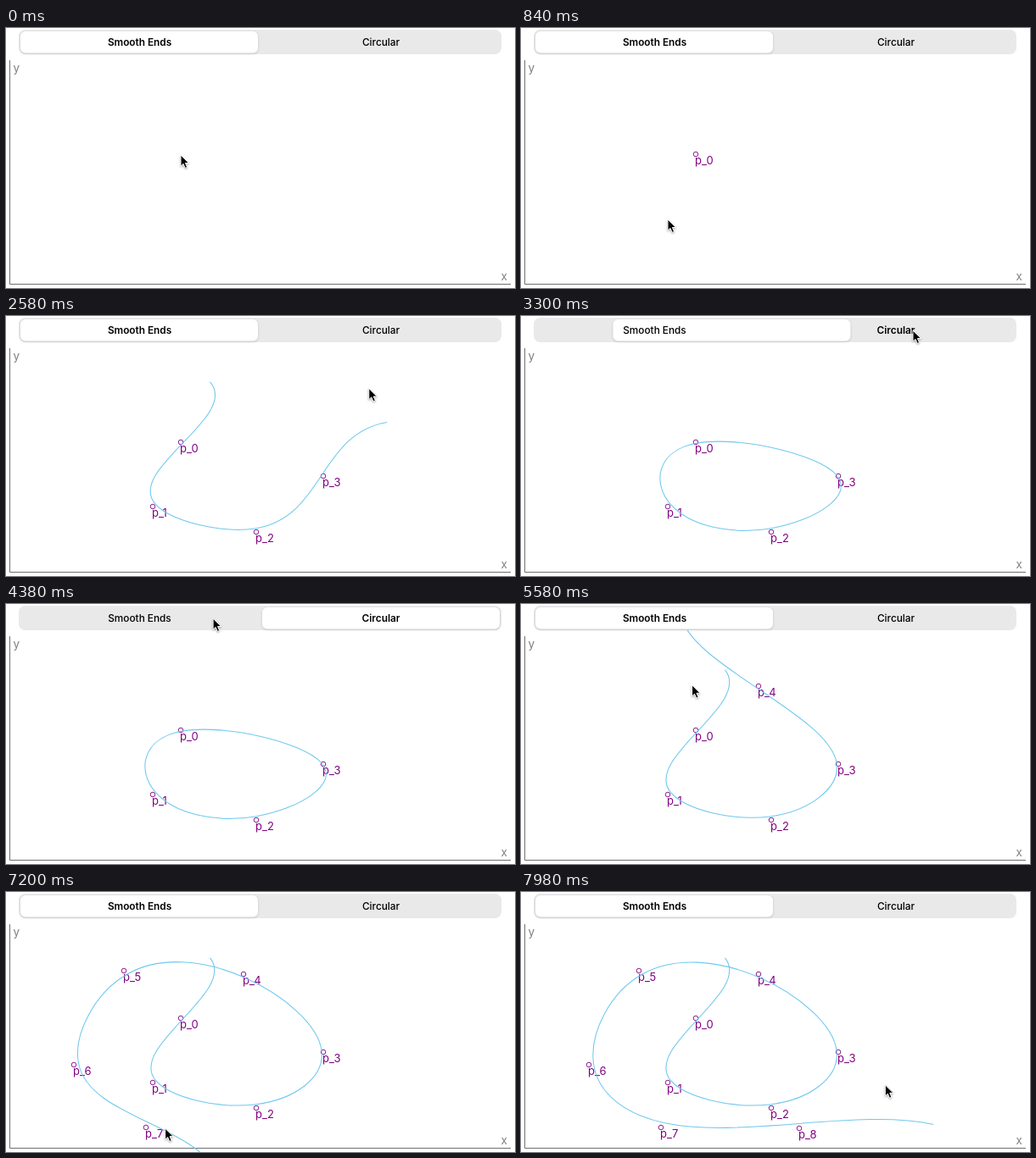
An HTML page for the animation above (8000 ms loop, 600 px wide and 307 px high).

```html
<!DOCTYPE html>
<html lang="en">
<head>
<meta charset="utf-8">
<title>Spline editor</title>
<style>
  html, body { margin: 0; width: 100%; height: 100%; overflow: hidden; background: #fff; }
  svg { display: block; width: 100vw; height: 100vh; font-family: Inter, Roboto, sans-serif; }
  .axis { fill: none; stroke: #6f6f6f; stroke-width: 1; }
  .axis-name { font-size: 13.5px; fill: #7f7f7f; }
  #curve { fill: none; stroke: #6fc8ee; stroke-width: 1.05; }
  .point circle { fill: none; stroke: #800080; stroke-width: .9; }
  .point text { font-size: 13px; fill: #800080; }
  .tab { font-size: 11.8px; font-weight: 500; text-anchor: middle; }
  .tab.on { font-weight: 600; }
  #thumb { fill: #fff; filter: drop-shadow(0 1px 1.5px rgba(0, 0, 0, .16)); }
  #cursor { stroke: #fff; stroke-width: 1; filter: drop-shadow(0 1px 1px rgba(0, 0, 0, .35)); }
</style>
</head>
<body>
<svg viewBox="0 0 600 307">
  <path class="axis" d="M4.5 38V302.5H595"/>
  <text class="axis-name" x="8.5" y="51.5">y</text>
  <text class="axis-name" x="583.5" y="297.5">x</text>
  <g id="points"></g>
  <path id="curve"/>
  <rect x="15" y="2" width="569" height="29" rx="7.5" fill="#e9e9e9"/>
  <rect id="thumb" y="4" width="280" height="25.5" rx="6"/>
  <text class="tab" x="157.5" y="21">Smooth Ends</text>
  <text class="tab" x="442" y="21">Circular</text>
  <path id="cursor" d="M0 0V13.2L3 10.4L5.2 15.4L7.6 14.4L5.4 9.5H9.6Z"/>
</svg>
<script>
const LOOP = 8000, SLIDE = 320;
const REST = 70, LEAD = 100;   // cursor stands still after and before a click
const PICKER_BOTTOM = 31;

// Everything follows from the clicks: in the plot they add a point,
// on the picker they switch the mode.
const clicks = [
  [360, 206, 149], [940, 173, 225], [1480, 295, 255], [1850, 374, 189],
  [3180, 463, 16], [4680, 230, 16],
  [5210, 280, 97], [5940, 139, 93], [6420, 80, 204], [7015, 165, 278], [7680, 328, 279]
].map(([time, x, y]) => ({ time, x, y }));
const points = clicks.filter(c => c.y > PICKER_BOTTOM);
const switches = clicks.filter(c => c.y <= PICKER_BOTTOM);
const exit = { time: LOOP + LEAD, x: 431, y: 226 };

const byId = id => document.getElementById(id);
const tabs = document.querySelectorAll('.tab');
const lerp = (a, b, v) => a + (b - a) * v;

function progress(t, from, to) {
  const v = Math.min(1, Math.max(0, (t - from) / (to - from)));
  return v * v * (3 - 2 * v);
}

byId('points').innerHTML = points.map(({ x, y }, i) =>
  `<g class="point"><circle cx="${x}" cy="${y}" r="2.8"/>` +
  `<text x="${x - 0.9}" y="${y + 12}">p_${i}</text></g>`).join('');
const markers = document.querySelectorAll('.point');

// The curve is drawn in a slightly inset plot area
const toPlot = ([x, y]) =>
  `${lerp(299.5, x, 0.975).toFixed(2)} ${lerp(170, y, 0.949).toFixed(2)}`;

// Second derivatives of the cubic spline, one coordinate at a time
function bends(values, closed) {
  const n = values.length, m = Array(n).fill(0);
  for (let pass = 0; pass < 40; pass++) {
    for (let i = closed ? 0 : 1; i < (closed ? n : n - 1); i++) {
      const prev = (i + n - 1) % n, next = (i + 1) % n;
      const d = values[prev] - 2 * values[i] + values[next];
      m[i] = (6 * d - m[prev] - m[next]) / 4;
    }
  }
  return m;
}

// Appends the wrap-around, or one mirrored segment at each end
function extend(values, closed) {
  const m = bends(values, closed), n = values.length;
  if (closed) return { v: [...values, values[0]], m: [...m, m[0]] };
  return {
    v: [2 * values[0] - values[1], ...values, 2 * values[n - 1] - values[n - 2]],
    m: [-m[1], ...m, -m[n - 2]]
  };
}

function splinePath(pts, closed) {
  if (pts.length < 3) return '';
  const axes = ['x', 'y'].map(k => extend(pts.map(p => p[k]), closed));
  let d = 'M' + toPlot(axes.map(a => a.v[0]));
  for (let i = 0; i < axes[0].v.length - 1; i++) {
    const c1 = axes.map(({ v, m }) =>
      lerp(v[i], v[i + 1], 1 / 3) - (2 * m[i] + m[i + 1]) / 18);
    const c2 = axes.map(({ v, m }) =>
      lerp(v[i], v[i + 1], 2 / 3) - (m[i] + 2 * m[i + 1]) / 18);
    d += `C${toPlot(c1)} ${toPlot(c2)} ${toPlot(axes.map(a => a.v[i + 1]))}`;
  }
  return d;
}

// Glides from each click to the next
function cursorAt(t) {
  const from = clicks.findLast(c => c.time <= t) || clicks[0];
  const to = clicks.find(c => c.time > t) || exit;
  const v = progress(t, from.time + REST, to.time - LEAD);
  return [lerp(from.x, to.x, v), lerp(from.y, to.y, v) + 1];
}

function draw(t) {
  const done = c => t >= c.time;
  const circular = switches.filter(done).length % 2 === 1;
  const [there, back] = switches.map(s => progress(t, s.time, s.time + SLIDE));
  byId('thumb').setAttribute('x', lerp(17, 302, there - back));
  tabs[0].classList.toggle('on', !circular);
  tabs[1].classList.toggle('on', circular);
  markers.forEach((g, i) => g.style.display = done(points[i]) ? '' : 'none');
  byId('curve').setAttribute('d', splinePath(points.filter(done), circular));
  byId('cursor').setAttribute('transform', `translate(${cursorAt(t)})`);
}

function tick() {
  draw(performance.now() % LOOP);
  requestAnimationFrame(tick);
}
tick();
</script>
</body>
</html>
```
